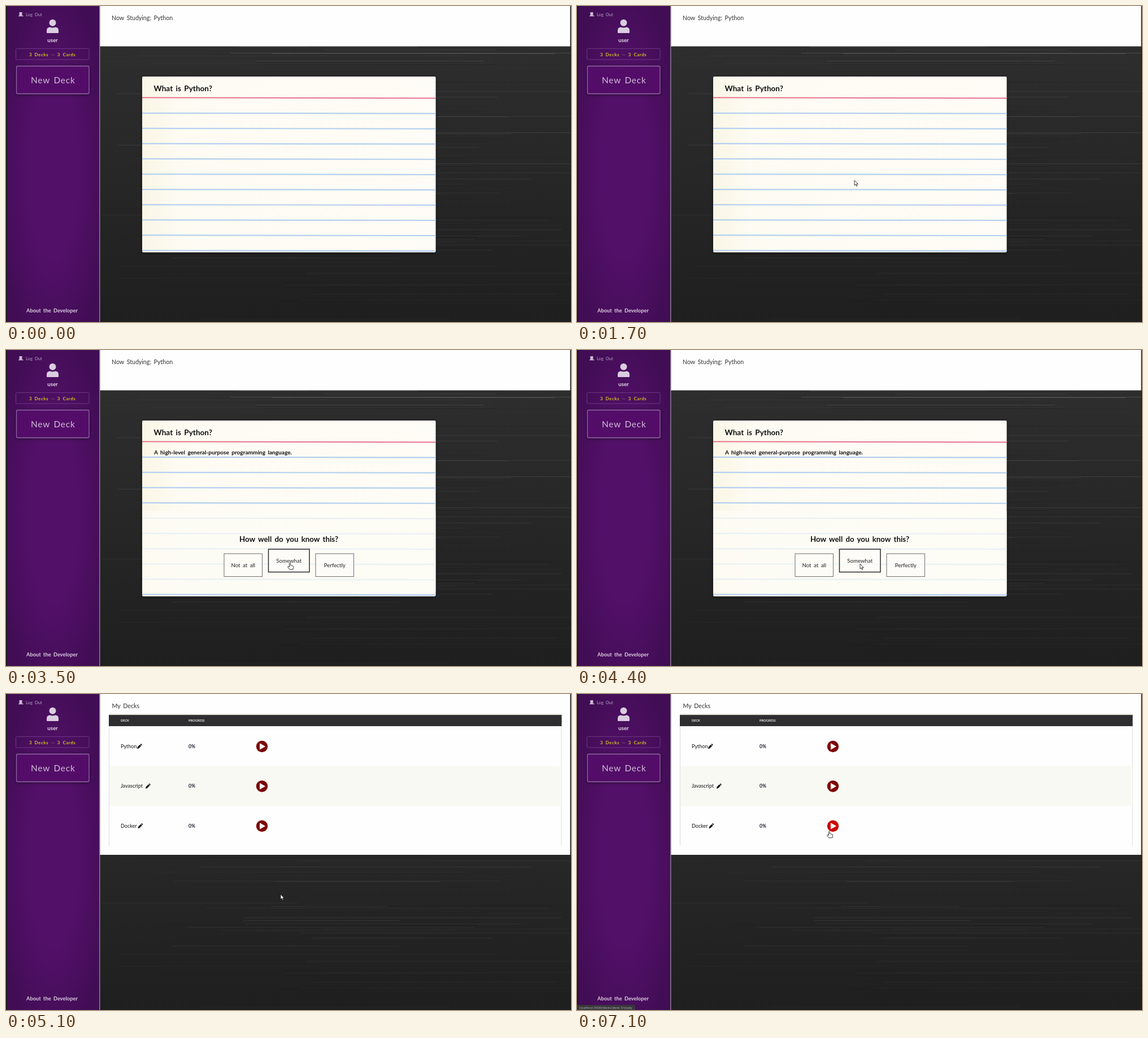
Recreate the animation shown at these times as an HTML page. Size 1000 by 560 pixels, loop 7.2 s.

```html
<!DOCTYPE html>
<html lang="en">
<head>
<meta charset="utf-8">
<title>Flashcards</title>
<style>
  html, body { margin: 0; width: 100%; height: 100%; overflow: hidden; background: #1b1b1b; }
  svg { display: block; width: 1000px; height: 560px; }
  text { font: 10px Lato, "Open Sans", sans-serif; word-spacing: 2px; white-space: pre; }
  .b { font-weight: bold; }
  .mid { text-anchor: middle; }
  .status { font-family: "Open Sans", sans-serif; font-size: 5.8px; word-spacing: 0; fill: #b5b5b5; }
</style>
</head>
<body>
<svg viewBox="0 0 1000 560">
  <defs>
    <radialGradient id="purple" cx=".5" cy=".52" r=".62">
      <stop offset=".45" stop-color="#521068"/>
      <stop offset="1" stop-color="#410d54"/>
    </radialGradient>
    <linearGradient id="dark" x2="0" y2="1">
      <stop stop-color="#303031"/>
      <stop offset="1" stop-color="#1f1f20"/>
    </linearGradient>
    <linearGradient id="paper">
      <stop stop-color="#faf6e6"/>
      <stop offset=".12" stop-color="#fdfbf2"/>
      <stop offset="1" stop-color="#fefcf6"/>
    </linearGradient>
    <filter id="shadow" x="-10%" y="-10%" width="120%" height="125%">
      <feDropShadow dx="0" dy="1" stdDeviation="2.5" flood-opacity=".6"/>
    </filter>
    <g id="pencil">
      <path d="M-4.2 4.2l.9-3.3 4.2-4.2 2.4 2.4-4.2 4.2zM1.5-3.9l.9-.8q.6-.3 1 .1l1.1 1.1q.4.4 0 1l-.7.9z" fill="#111"/>
    </g>
  </defs>

  <rect x="166" width="833" height="560" fill="url(#dark)"/>
  <g id="grain"></g>

  <g id="sidebar">
    <rect x="2" width="163" height="560" fill="url(#purple)"/>
    <rect x="165" width="1.5" height="560" fill="#8d7c95"/>
    <path d="M23.500 11h5v6h2v1.300h-8.500v-1.300h1.500z" fill="#cdbad6"/>
    <text x="35" y="17.500" fill="#b9a3c4" style="font-size:7.600px">Log Out</text>
    <g fill="#d9cddf">
      <circle cx="82.500" cy="29.700" r="6"/>
      <path d="M72 47v-3.500q0-6 6-6q4.500 1.800 9 0q6 0 6 6v3.500q0 1-1 1h-19q-1 0-1-1z"/>
    </g>
    <text class="b mid" x="82.500" y="64" fill="#e4dae8" style="font-size:9.600px">user</text>
    <rect x="17.500" y="75.500" width="129.500" height="19.500" rx="2" fill="none" stroke="#6d3784"/>
    <text class="b" x="41" y="88.500" fill="#d2c41c" style="font-size:8px;letter-spacing:.5px">3 Decks <tspan fill="#84705a">—</tspan> 3 Cards</text>
    <rect x="18.500" y="106.500" width="128.500" height="49" rx="2" fill="#521068" stroke="#8b64a0" stroke-width="1.300" filter="url(#shadow)"/>
    <text x="44" y="137" fill="#d0bfd8" style="font-size:15.400px;letter-spacing:.8px">New Deck</text>
    <text class="b" x="36" y="542.500" fill="#d9cddf" style="font-size:9.300px">About the Developer</text>
  </g>

  <g id="study">
    <rect x="166.500" width="832" height="71.500" fill="#fefefe"/>
    <text x="187" y="25" fill="#333" style="font-size:10.600px">Now Studying: Python</text>
    <rect x="241" y="125" width="519.500" height="311.500" rx="2" fill="url(#paper)" filter="url(#shadow)"/>
    <path d="M241 162.300L760.500 163.300" stroke="#e2657f" stroke-width="1.700"/>
    <g id="rules" stroke="#b5d0ef" stroke-width="2.200"></g>
    <text class="b" x="261.500" y="150.500" fill="#111" style="font-size:13.600px">What is Python?</text>
    <g id="answer">
      <rect x="241" y="285" width="519.500" height="144" fill="#fefcf6" opacity=".72"/>
      <text class="b" x="262" y="184.500" fill="#111" style="font-size:10.100px">A high-level general-purpose programming language.</text>
      <text class="b mid" x="500.500" y="339.500" fill="#111" style="font-size:13.300px">How well do you know this?</text>
      <g id="ratings" fill="#fefdfa"></g>
    </g>
  </g>

  <g id="decks">
    <rect x="166.500" width="832" height="285" fill="#fefefe"/>
    <text x="187.500" y="25" fill="#333" style="font-size:10.700px">My Decks</text>
    <path d="M182.500 57V269M983 57V269" stroke="#dcdcdc"/>
    <rect x="182" y="37" width="801.500" height="20" fill="#2e2d30"/>
    <path d="M182 37H983.500" stroke="#8b8468" stroke-width=".8"/>
    <rect x="183" y="128" width="800" height="71" fill="#f9f9f4"/>
    <g fill="#eee">
      <text class="b" x="203" y="48.800" style="font-size:5.600px">DECK</text>
      <text class="b" x="323" y="48.800" style="font-size:5.600px">PROGRESS</text>
    </g>
    <g id="rows"></g>
  </g>

  <g id="connecting">
    <path d="M0 550h331q2 0 2 2v8H0z" fill="#38373a"/>
    <text class="status" x="4" y="557.700">Connecting...</text>
  </g>
  <g id="link">
    <path d="M0 551h101q2 0 2 2v7H0z" fill="#38373a"/>
    <text class="status" x="4" y="557.700">localhost:3000/decks/deck-3/study</text>
  </g>

  <g stroke="#222" stroke-width=".9" stroke-linejoin="round" fill="#fff">
    <path id="arrow" d="M0 0V8.800L2 7L3.500 10.200L5 9.500L3.600 6.500H6.200z"/>
    <path id="hand" d="M-1 1q1-1.600 2 0v3.500l4 1q1.300.4 1.200 1.800l-.7 4.500H-.8L-3.800 7.500q0-1.500 1.400-1l1.400 1.200z"/>
  </g>
</svg>
<script>
const $ = id => document.getElementById(id);
const LOOP = 7200, REVEAL = 2500, LOADING = 4400, LIST = 4500, HOVER = 5500;

// Brushed texture of the dark backdrop
let seed = 7;
const rnd = () => (seed = seed * 16807 % 2147483647) / 2147483647;
let grain = '';
for (let i = 0; i < 150; i++) {
  const y = 72 + Math.floor(rnd() * 488), x = 166 + rnd() * 400;
  grain += `<path d="M${x} ${y + .5}H${x + 200 + rnd() * 500}" stroke="${rnd() < .6 ? '#000' : '#fff'}" opacity="${rnd() * (1.1 - y / 600) * .16}"/>`;
}
$('grain').innerHTML = `<svg x="166" width="833" height="560" viewBox="166 0 833 560">${grain}</svg>`;

let rules = '';
for (let i = 0; i < 10; i++) {
  const y = 189.8 + i * 27.05;
  rules += `<path d="M241 ${y}Q500 ${y + .1} 760.500 ${y + .8}"/>`;
}
$('rules').innerHTML = rules;

const rating = (label, x, y, w, stroke, weight) =>
  `<rect x="${x}" y="${y}" width="${w}" height="40.500" fill-opacity=".6" stroke="${stroke}" stroke-width="${weight}"/>
   <text class="mid" x="${x + w / 2}" y="${y + 24}" fill="#222" style="font-size:9.700px">${label}</text>`;
$('ratings').innerHTML =
  rating('Not at all', 386, 361, 67.5, '#777', 1.1) +
  rating('Somewhat', 464.5, 353, 72.5, '#2a2a2a', 1.5) +
  rating('Perfectly', 548, 361, 67.5, '#777', 1.1);

$('rows').innerHTML = [['Python', 236], ['Javascript', 251], ['Docker', 237.5]].map(([name, x], i) => {
  const y = 93 + i * 70.5;
  return `<text x="203" y="${y + 2.8}" fill="#111" style="font-size:9px">${name}</text>
    <use href="#pencil" x="${x}" y="${y}"/>
    <text class="b" x="323" y="${y + 2.8}" fill="#223" style="font-size:8.500px">0%</text>
    <circle cx="453" cy="${y}" r="10.200" fill="#7c0303"/>
    <path d="M449.500 ${y - 5}l8.800 5l-8.800 5z" fill="#fff" stroke="#fff" stroke-linejoin="round"/>`;
}).join('');
const dockerPlay = $('rows').querySelectorAll('circle')[2];

// Pointer track: time, x, y
const track = [
  [900, 905, 545], [1200, 491, 309], [2100, 491, 309], [2200, 501, 371], [2400, 501, 371],
  [2500, 502.5, 377], [4300, 502.5, 377], [4400, 501, 379], [4700, 501, 379],
  [5100, 486, 355], [5500, 446.5, 243], [LOOP, 446.5, 243]
];
function pointerAt(t) {
  const i = Math.max(1, track.findIndex(p => p[0] >= t));
  const [t0, x0, y0] = track[i - 1], [t1, x1, y1] = track[i];
  const k = (t - t0) / (t1 - t0);
  return [x0 + (x1 - x0) * k, y0 + (y1 - y0) * k];
}

const show = (id, on) => $(id).style.display = on ? '' : 'none';

function draw(now) {
  const t = Math.floor(now % LOOP / 100) * 100;
  const hover = t >= HOVER;
  const hand = hover || t >= REVEAL && t < LOADING;
  show('study', t < LIST);
  show('answer', t >= REVEAL);
  show('decks', t >= LIST);
  show('connecting', t >= LIST && t < 4800);
  show('link', hover);
  dockerPlay.setAttribute('fill', hover ? '#cb0505' : '#7c0303');

  const visible = t >= track[0][0];
  show('arrow', visible && !hand);
  show('hand', visible && hand);
  if (visible) $(hand ? 'hand' : 'arrow').setAttribute('transform', `translate(${pointerAt(t)})`);
}

const start = performance.now();
function tick() {
  draw(performance.now() - start);
  requestAnimationFrame(tick);
}
tick();
</script>
</body>
</html>
```
